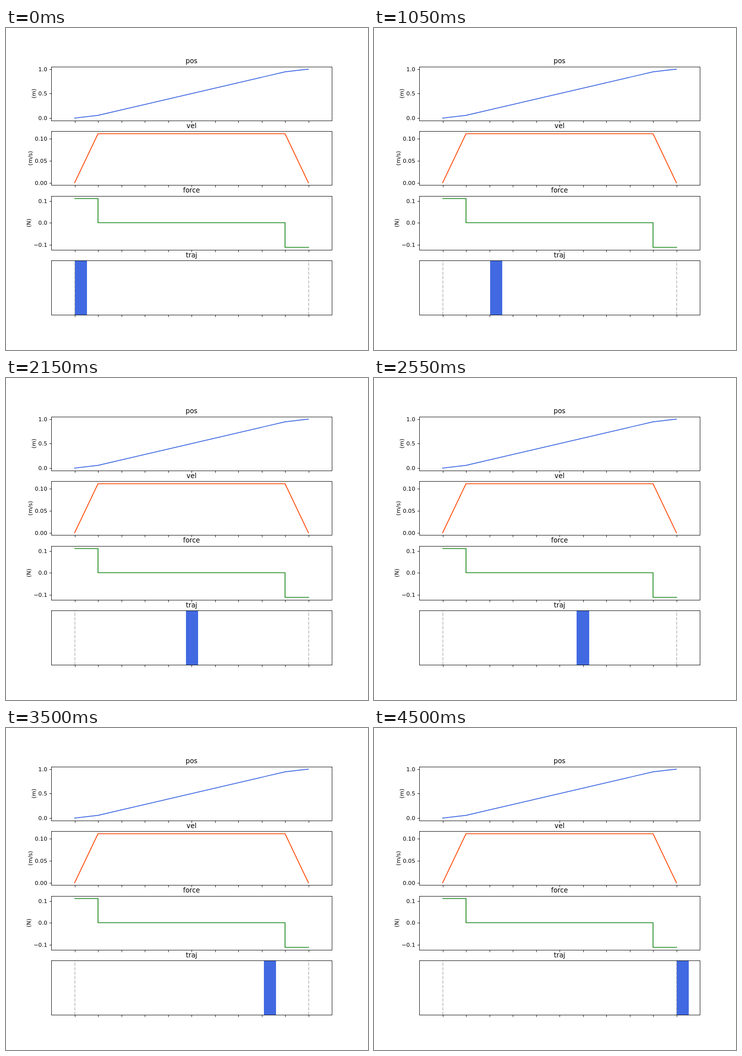
These frames come from a looping animation (720 by 640 pixels, 5 s). An HTML page:

```html
<!DOCTYPE html>
<html lang="en">
<head>
<meta charset="utf-8">
<title>Trapezoidal motion</title>
<style>
  html, body { margin: 0; width: 100%; height: 100%; overflow: hidden; background: #fff; }
  svg { display: block; }
  text { font: 11.11px "DejaVu Sans", sans-serif; fill: #000; text-anchor: middle; }
  .title { font-size: 13.33px; }
  .tick { text-anchor: end; }
  .axis { fill: none; stroke: #000; stroke-width: .89; }
  .curve { fill: none; stroke-width: 1.667; stroke-linecap: square; stroke-linejoin: round; }
  .limit { stroke: #808080; stroke-opacity: .5; stroke-width: 1.667; stroke-dasharray: 6.17 2.67; }
</style>
</head>
<body>
<svg id="stage" width="720" height="640" viewBox="0 0 720 640"></svg>
<script>
const LEFT = 90, RIGHT = 648, X0 = 136.5, SECOND = 46.5, TRAVEL = 465;
const HEIGHT = 107.13, STEP = 128.56, TOP = 76.8;
const FRAME_MS = 50, LOOP_MS = 5000, STEPS = 90, BLOCK = 23.25;

const stage = document.getElementById('stage');
const snap = v => Math.floor(v + 0.5);
const timeX = s => X0 + s * SECOND;

function add(tag, attrs, text) {
  const el = document.createElementNS('http://www.w3.org/2000/svg', tag);
  for (const k in attrs) el.setAttribute(k, attrs[k]);
  if (text) el.textContent = text;
  return stage.appendChild(el);
}

const V = 1 / 9;
const panels = [
  { title: 'pos', unit: '(m)', unitX: 59, color: '#4169e1', min: 0, max: 1,
    ticks: [[0, '0.0'], [0.5, '0.5'], [1, '1.0']],
    data: [[0, 0], [1, V / 2], [9, 1 - V / 2], [10, 1]] },
  { title: 'vel', unit: '(m/s)', unitX: 52, color: '#ff4500', min: 0, max: V,
    ticks: [[0, '0.00'], [0.05, '0.05'], [0.1, '0.10']],
    data: [[0, 0], [1, V], [9, V], [10, 0]] },
  { title: 'force', unit: '(N)', unitX: 49, color: '#228b22', min: -V, max: V, snapped: true,
    ticks: [[-0.1, '\u22120.1'], [0, '0.0'], [0.1, '0.1']],
    data: [[0, V], [1, V], [1, 0], [9, 0], [9, -V], [10, -V]] },
  { title: 'traj', ticks: [] }
];

const block = add('rect', { y: 462, height: 109, fill: '#4169e1' });
for (const x of [137, 602])
  add('line', { class: 'limit', x1: x, x2: x, y1: 570, y2: 462 });

panels.forEach((p, i) => {
  const top = TOP + i * STEP, bottom = top + HEIGHT;
  const t = snap(top), b = snap(bottom);
  const valueY = v => bottom - HEIGHT * (0.05 + (v - p.min) / (p.max - p.min)) / 1.1 * 1
    + HEIGHT * 0.05 / 1.1 - HEIGHT * 0.05 / 1.1 * (1 - 0.05) - HEIGHT * 0.05 * 0.05 / 1.1;

  if (p.data) {
    const fit = p.snapped ? snap : v => v;
    const points = p.data.map(([s, v]) => [fit(timeX(s)), fit(valueY(v))]);
    add('polyline', { class: 'curve', stroke: p.color, points: points.join(' ') });
    const mid = (top + bottom) / 2;
    add('text', { transform: `translate(${p.unitX} ${mid}) rotate(-90)` }, p.unit);
  }

  let marks = '';
  for (let s = 0; s <= 10; s++) marks += `M${snap(timeX(s)) + 0.5} ${b + 0.5}v4`;
  for (const [v, label] of p.ticks) {
    const y = snap(valueY(v));
    marks += `M${LEFT + 0.5} ${y + 0.5}h-4`;
    add('text', { class: 'tick', x: 82, y: y + 4 }, label);
  }
  add('path', { class: 'axis', d: marks });
  add('rect', { class: 'axis', x: LEFT + 0.5, y: t + 0.5, width: RIGHT - LEFT, height: b - t });
  add('text', { class: 'title', x: 369, y: snap(top - 6.67) }, p.title);
});

// Share of the travel after n steps: half speed for the first and last nine.
function travelled(n) {
  const ramp = 9, half = V / 2;
  if (n < ramp) return half * n / ramp;
  if (n > STEPS - ramp) return 1 - half * (STEPS - n) / ramp;
  return half + V * (n - ramp) / ramp;
}

function draw(now) {
  const n = Math.min(STEPS, Math.floor(now % LOOP_MS / FRAME_MS));
  const x = X0 + TRAVEL * travelled(n);
  const left = snap(x) - 0.055, right = snap(x + BLOCK) + 1.055;
  block.setAttribute('x', left);
  block.setAttribute('width', right - left);
}

let start;
function tick(now) {
  start ??= now;
  draw(now - start);
  requestAnimationFrame(tick);
}
draw(0);
requestAnimationFrame(tick);
</script>
</body>
</html>
```
